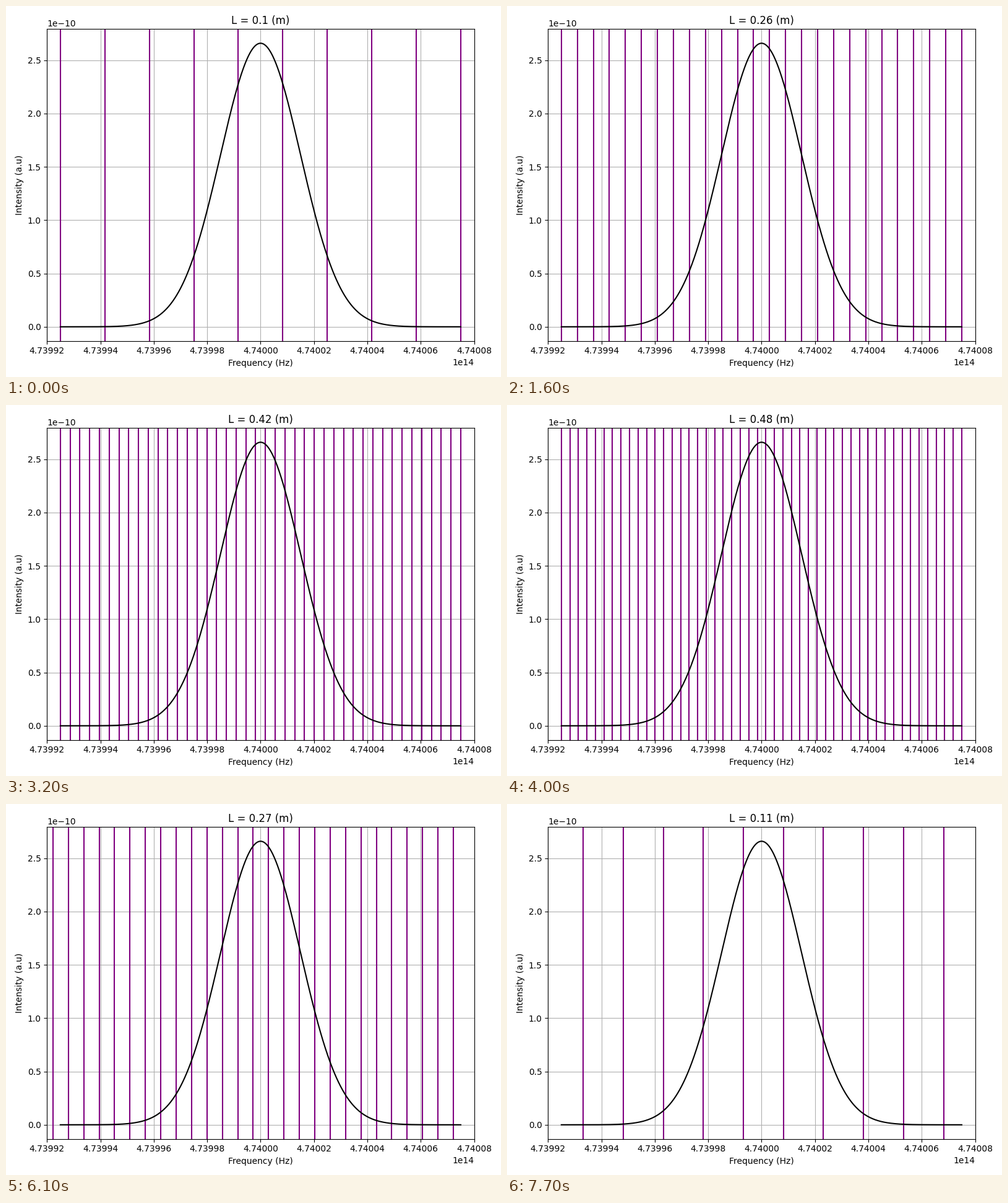
These frames come from a looping animation (800 by 600 pixels, 7800 ms). A matplotlib script:

```python
import numpy as np
import matplotlib.pyplot as plt
from matplotlib.animation import FuncAnimation

C = 3e8            # speed of light, m/s
NU0 = 4.74e14      # line centre, Hz
SIGMA = 1.5e9      # gain width, Hz
GAIN_SPAN = 1.5e10
PEAK = 39          # frames until the cavity is longest
FRAMES = 2 * PEAK


def cavity_length(i):
    return round(0.1 + 0.01 * min(i, FRAMES - i), 2)


def cavity_modes(length):
    fsr = C / (2 * length)
    n = round(GAIN_SPAN / fsr)
    return np.linspace(NU0 + (-n // 2) * fsr, NU0 + (n // 2) * fsr, n)


fig, ax = plt.subplots(figsize=(8, 6), dpi=100)

max_modes = len(cavity_modes(cavity_length(PEAK)))
mode_lines = [ax.axvline(NU0, color="purple", lw=1.5) for _ in range(max_modes)]

nu = np.linspace(NU0 - GAIN_SPAN / 2, NU0 + GAIN_SPAN / 2, 1000)
gain = np.exp(-((nu - NU0) / SIGMA) ** 2 / 2) / (SIGMA * np.sqrt(2 * np.pi))
ax.plot(nu, gain, color="black", lw=1.5)

ax.set_xlim(NU0 - 8e9, NU0 + 8e9)
ax.ticklabel_format(axis="x", useOffset=False)
ax.set_xlabel("Frequency (Hz)")
ax.set_ylabel("Intensity (a.u)")
ax.grid(True)
title = ax.set_title("L = 0.1 (m)")
fig.tight_layout()


def update(i):
    length = cavity_length(i)
    modes = cavity_modes(length)
    for k, line in enumerate(mode_lines):
        line.set_visible(k < len(modes))
        if k < len(modes):
            line.set_xdata([modes[k], modes[k]])
    title.set_text(f"L = {length} (m)")
    return [*mode_lines, title]


anim = FuncAnimation(fig, update, frames=FRAMES, interval=100, repeat=True)
plt.show()
```
